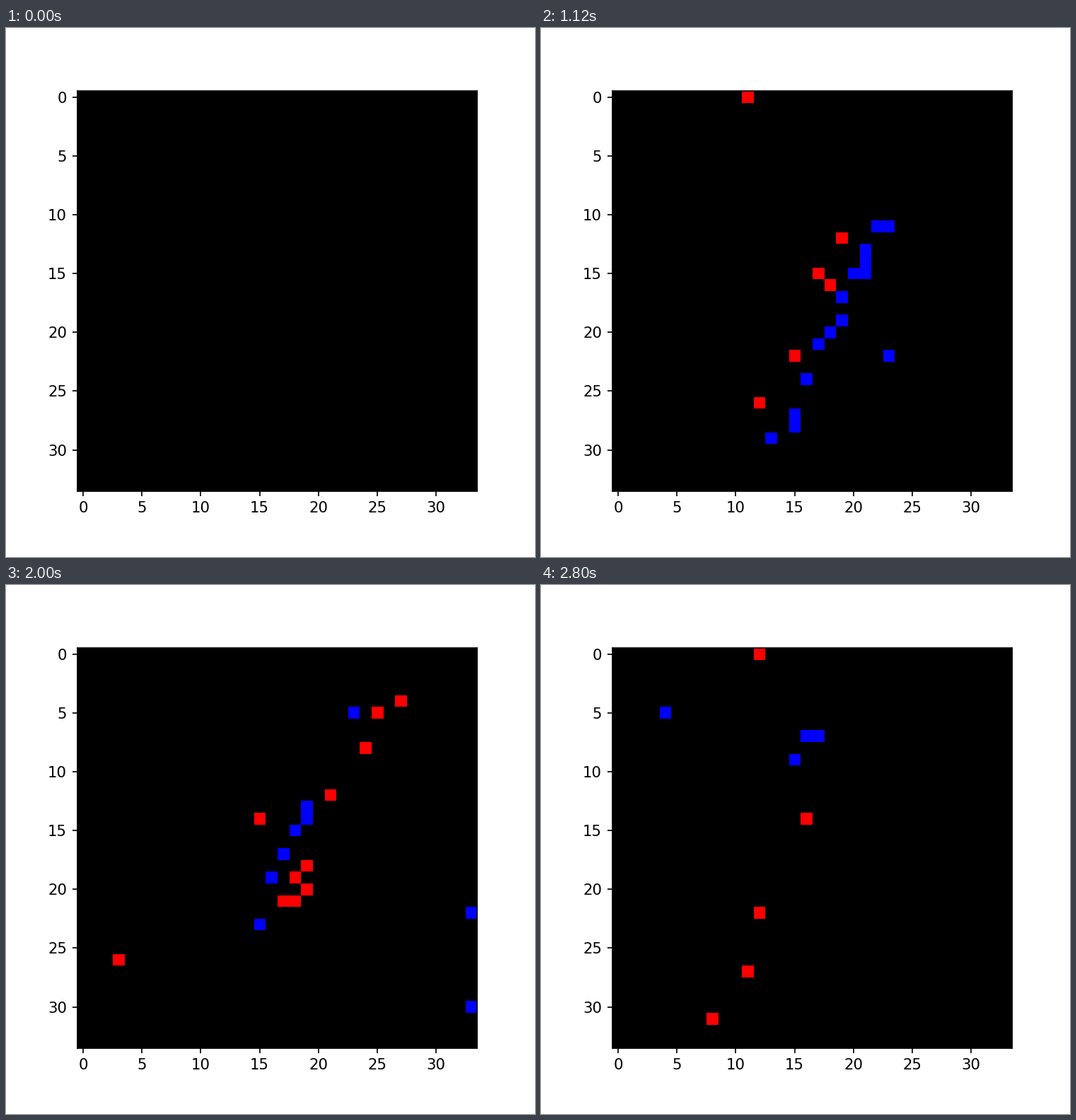
A matplotlib script for the animation above (2840 ms loop, 748x748 px).

```python
import numpy as np
import matplotlib.pyplot as plt
from matplotlib.animation import FuncAnimation

SIZE, DPI = 748, 136
PX = 72 / DPI          # one pixel in points
GRID, FRAMES, STEP = 34, 71, 40
RED, BLUE = 0, 2       # colour channels

# The bar's centre travels round a triangle: down right, up right, back left.
CORNERS = np.array([(13.4, 15.5), (16.3, 20.8), (20.3, 13.6)])
SLOPE = -0.48          # columns per row
HALF_LENGTH = 9.3      # rows
HALF_WIDTH = 1.35      # columns
SPREAD = 0.75          # sideways scatter of the edge cells


def light(img, x, y, channel):
    x, y = int(round(x)), int(round(y))
    if 0 <= x < GRID and 0 <= y < GRID:
        img[y, x, channel] = 255


def draw_edge(img, rng, center, side, rate, channel):
    cx, cy = center
    for y in range(round(cy - HALF_LENGTH), round(cy + HALF_LENGTH) + 1):
        x = cx + SLOPE * (y - cy) + side * HALF_WIDTH
        for shift in rng.uniform(-SPREAD, SPREAD, 2):
            if rng.random() < rate:
                light(img, x + shift, y, channel)


def picture(i):
    rng = np.random.default_rng(100 + i)
    img = np.zeros((GRID, GRID, 3), np.uint8)

    leg, u = divmod(3 * i / FRAMES, 1)
    leg = int(leg)
    ease = u * u * (3 - 2 * u)
    center = CORNERS[leg] + ease * (CORNERS[(leg + 1) % 3] - CORNERS[leg])

    # Blue leads and red trails; red fades while the bar slides along itself.
    rate = np.sin(np.pi * u) ** 1.2
    lead = -1 if leg == 2 else 1
    draw_edge(img, rng, center, lead, rate, BLUE)
    draw_edge(img, rng, center, -lead, rate * (0.5 if leg == 1 else 1), RED)

    for _ in range(rng.integers(0, 5)):
        light(img, *rng.integers(0, GRID, 2), rng.choice([RED, RED, BLUE]))
    return img


fig = plt.figure(figsize=(SIZE / DPI, SIZE / DPI), dpi=DPI, facecolor="white")
left, top, side = 100.9, 89.4, 565.3
ax = fig.add_axes([left / SIZE, 1 - (top + side) / SIZE, side / SIZE, side / SIZE])
image = ax.imshow(picture(0), interpolation="nearest")
ax.set_xticks(range(0, 31, 5))
ax.set_yticks(range(0, 31, 5))
ax.tick_params(length=7.4 * PX, width=1.7 * PX, pad=7.4 * PX,
               labelsize=21.2 * PX, labelfontfamily="DejaVu Sans")
for spine in ax.spines.values():
    spine.set_linewidth(1.7 * PX)


def update(i):
    image.set_data(picture(i))
    return [image]


anim = FuncAnimation(fig, update, frames=FRAMES, interval=STEP,
                     repeat=True, repeat_delay=0)
plt.show()
```
